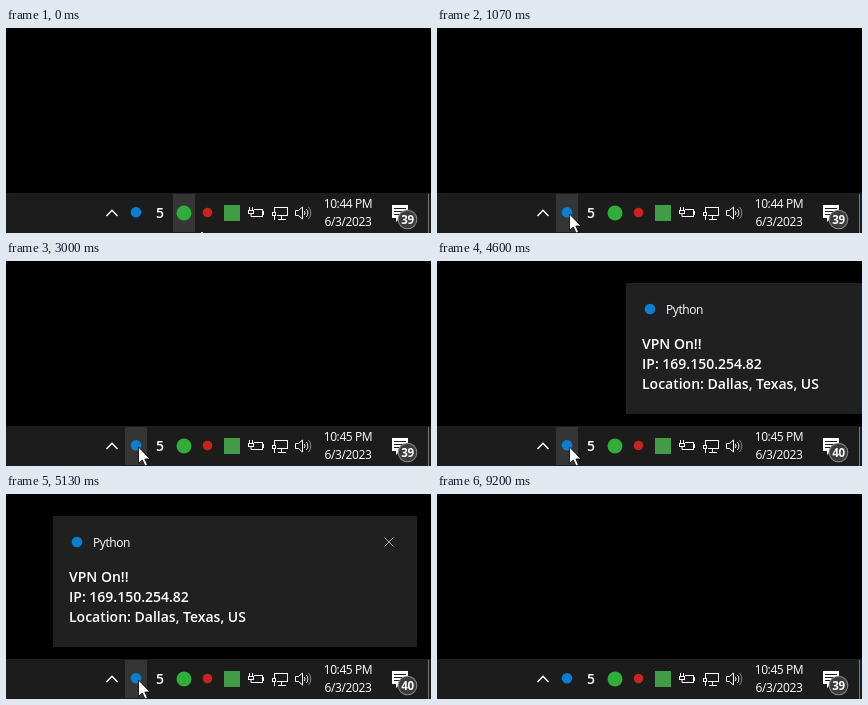
An HTML page with a canvas that plays this animation: 425 by 205 pixels, repeating every 9990 ms.

```html
<!DOCTYPE html>
<html lang="en">
<head>
<meta charset="utf-8">
<title>Tray notification</title>
<style>
html, body { margin: 0; width: 100%; height: 100%; overflow: hidden; background: #000; }
canvas { display: block; width: 425px; height: 205px; }
</style>
</head>
<body>
<canvas id="stage" width="425" height="205"></canvas>
<script>
const ctx = document.getElementById('stage').getContext('2d');
const LOOP = 9990;
const FONT = '"Open Sans", "Noto Sans", sans-serif';
const BAR = '#1c1c1c', BLUE = '#0a7fd0';

// Progress from 1/count to 1 in discrete steps between two times; 0 before.
function stepped(t, start, end, count) {
  if (t < start) return 0;
  const index = Math.floor((t - start) / (end - start) * (count - 1) + 0.01);
  return Math.min(1, (index + 1) / count);
}

const mix = (a, b, u) => a + (b - a) * u;

function bezier(u, a, b, c, d) {
  const v = 1 - u;
  return v * v * v * a + 3 * v * v * u * b + 3 * v * u * u * c + u * u * u * d;
}

function rect(x, y, w, h, color) {
  ctx.fillStyle = color;
  ctx.fillRect(x, y, w, h);
}

function disc(x, y, r, color) {
  ctx.fillStyle = color;
  ctx.beginPath();
  ctx.arc(x, y, r, 0, Math.PI * 2);
  ctx.fill();
}

function trace(points, closed) {
  ctx.beginPath();
  points.forEach(([x, y]) => ctx.lineTo(x, y));
  if (closed) ctx.closePath();
}

function line(points, color = '#fff', width = 1, closed = false) {
  trace(points, closed);
  ctx.strokeStyle = color;
  ctx.lineWidth = width;
  ctx.stroke();
}

function shape(points, color) {
  trace(points, true);
  ctx.fillStyle = color;
  ctx.fill();
}

function text(str, x, y, { size = 12, weight = 400, align = 'left', spacing = 0 }) {
  ctx.font = `${weight} ${size}px ${FONT}`;
  ctx.letterSpacing = `${spacing}px`;
  ctx.textAlign = align;
  ctx.fillStyle = '#fff';
  ctx.fillText(str, x, y);
}

const CLOCK = { align: 'center', spacing: -0.4 };
const TITLE = { spacing: -0.4 };
const BODY = { size: 14, weight: 600 };
const BADGE = { size: 11.5, weight: 700, align: 'center', spacing: -0.3 };
const DIGIT = { size: 14, weight: 600, align: 'center' };

function pointerAt(t) {
  if (t < 270) return { x: 195.5, y: 204 };
  if (t < 870) {
    const u = stepped(t, 270, 730, 8);
    return { x: bezier(u, 195, 335, 298, 151), y: bezier(u, 204, 132, 110, 186) };
  }
  return {
    x: mix(151, 132.5, stepped(t, 870, 1070, 4)),
    y: mix(186, 207, stepped(t, 6670, 6870, 4))
  };
}

function drawHover(t, { x, y }) {
  if (y < 166 || y >= 205) return;
  const cell = t < 130 ? 2 : Math.floor((x - 119) / 23.8);
  rect(Math.round(119 + cell * 23.8), 166, 22, 38, '#353535');
}

function drawBattery() {
  ctx.strokeStyle = '#fff';
  ctx.lineWidth = 1;
  ctx.strokeRect(246.5, 181.5, 10, 7);
  rect(257, 183, 1, 4, '#fff');
  rect(242, 179, 6, 11, BAR);
  rect(243, 179, 1, 3, '#fff');
  rect(246, 179, 1, 3, '#fff');
  ctx.strokeRect(242.5, 182.5, 5, 3);
  line([[245, 186], [245, 188.5], [248, 188.5]]);
}

function drawNetwork() {
  ctx.strokeStyle = '#fff';
  ctx.lineWidth = 1;
  ctx.strokeRect(268.5, 179.5, 13, 8);
  rect(275, 188, 1, 3, '#fff');
  rect(272, 191, 8, 1, '#fff');
  rect(265, 184, 6, 8, BAR);
  ctx.strokeRect(266.5, 184.5, 3, 3);
  rect(268, 188, 1, 4, '#fff');
}

function drawSpeaker() {
  line([[289.5, 182.5], [292.5, 182.5], [296.5, 179], [296.5, 191], [292.5, 187.5], [289.5, 187.5]], '#fff', 1, true);
  ['#fff', '#eee', '#888'].forEach((color, i) => {
    ctx.strokeStyle = color;
    ctx.beginPath();
    ctx.arc(296, 185, 3 + i * 2.9, -0.75, 0.75);
    ctx.stroke();
  });
}

function drawActionCenter(count) {
  shape([[386, 177], [402, 177], [402, 190], [394, 190], [390, 194], [390, 190], [386, 190]], '#fff');
  for (const y of [180, 183, 186]) rect(388, y, 12, 1, BAR);
  disc(401.5, 191.5, 9.8, '#8a8a8a');
  disc(401.5, 191.5, 8.8, '#3c3c3c');
  text(count, 401.5, 196, BADGE);
}

function drawTaskbar(t, pointer) {
  rect(0, 165, 425, 40, BAR);
  drawHover(t, pointer);
  line([[100.5, 188], [106, 182.3], [111.5, 188]], '#fff', 1.4);
  ctx.globalAlpha = t >= 2800 && t < 3000 ? 0.75 : 1;
  disc(130, 184.3, 5.3, BLUE);
  ctx.globalAlpha = 1;
  text('5', 154, 190, DIGIT);
  disc(178, 185, 7.5, '#2fae3a');
  disc(201.5, 184.5, 4.8, '#c8241e');
  rect(218, 177, 16, 16, '#429e46');
  drawBattery();
  drawNetwork();
  drawSpeaker();
  text(t < 1530 ? '10:44 PM' : '10:45 PM', 342, 180, CLOCK);
  text('6/3/2023', 342, 198, CLOCK);
  drawActionCenter(t >= 4270 && t < 9200 ? '40' : '39');
  rect(422, 166, 1, 39, '#777');
}

function drawToast(t) {
  if (t < 4600 || t >= 9200) return;
  const u = (stepped(t, 4600, 5130, 9) * 9 - 1) / 8;
  ctx.save();
  ctx.translate(Math.round(142 * (1 - u) ** 3), 0);
  rect(47, 22, 364, 131, '#202020');
  disc(71, 48, 5.3, BLUE);
  text('Python', 87, 53, TITLE);
  line([[378.5, 43.5], [387.5, 52.5]], '#aaa');
  line([[387.5, 43.5], [378.5, 52.5]], '#aaa');
  ['VPN On!!', 'IP: 169.150.254.82', 'Location: Dallas, Texas, US']
    .forEach((row, i) => text(row, 63, 88 + i * 20, BODY));
  ctx.restore();
}

// Pointer locator: a ring that closes in on the pointer.
function drawLocator(t, { x, y }) {
  if (t < 1800 || t >= 2270) return;
  const u = stepped(t, 1800, 2270, 7) - 1 / 7;
  ctx.strokeStyle = 'rgba(160, 160, 160, 0.6)';
  ctx.lineWidth = 4;
  ctx.beginPath();
  ctx.arc(x, y, 98 * (1 - u), 0, Math.PI * 2);
  ctx.stroke();
}

function drawPointer({ x, y }) {
  ctx.save();
  ctx.translate(x, y);
  const arrow = [[0, 0], [0, 16.5], [3.8, 13], [6.5, 19], [9, 18], [6.4, 12], [11.5, 12]];
  shape(arrow, '#fff');
  line(arrow, '#000', 0.8, true);
  ctx.restore();
}

function draw(now) {
  const t = (now - startTime) % LOOP;
  const pointer = pointerAt(t);
  rect(0, 0, 425, 205, '#000');
  drawTaskbar(t, pointer);
  drawToast(t);
  drawLocator(t, pointer);
  if (t < 270) rect(195, 204, 2, 1, '#ddd');
  else if (pointer.y < 205) drawPointer(pointer);
}

function loop() {
  draw(performance.now());
  requestAnimationFrame(loop);
}

const startTime = performance.now();
loop();
</script>
</body>
</html>
```
